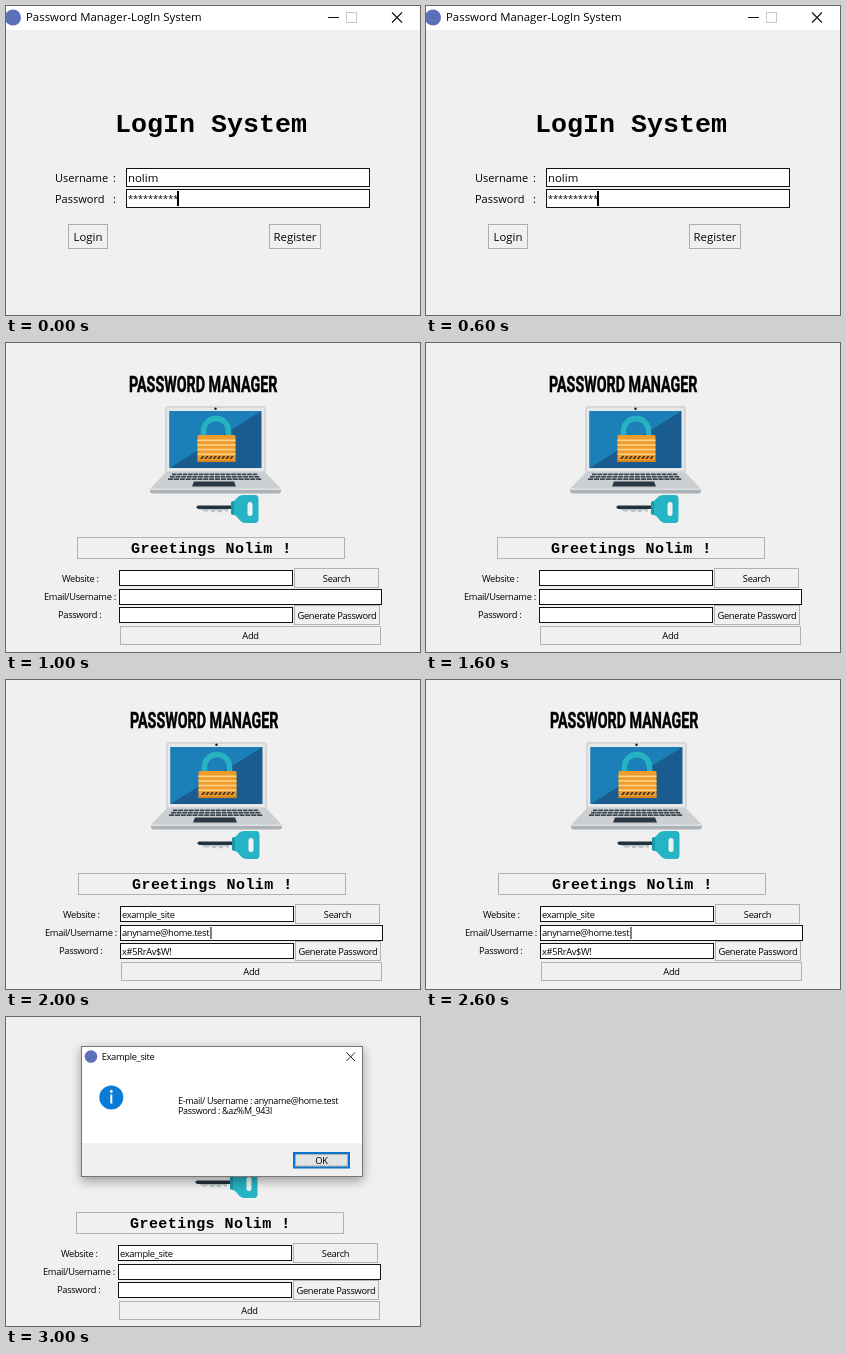
An HTML page that plays this animation: 414x309 px, repeating every 4 s.

```html
<!DOCTYPE html>
<html lang="en">
<head>
<meta charset="utf-8">
<title>Password manager demo</title>
<style>
  html, body { margin: 0; width: 100%; height: 100%; overflow: hidden; background: #f0f0f0; }
  svg { display: block; width: 414px; height: 309px; }
  text { font-family: "Open Sans", "Noto Sans", sans-serif; fill: #000; white-space: pre; }
  .ui { font-size: 11.4px; }
  .label { font-size: 11px; }
  .small { font-size: 9.3px; letter-spacing: -.32px; }
  .note { font-size: 9px; letter-spacing: -.32px; }
  .stars { font-size: 9.1px; }
  .mono { font-family: "Liberation Mono", "Courier New", monospace; font-weight: 700; }
  .title { font-size: 26.67px; }
  .greet { font-size: 15px; letter-spacing: .45px; }
  .head { font-family: Roboto, "Open Sans", sans-serif; font-weight: 700; font-size: 21.5px; stroke: #000; stroke-width: .5; }
  .mid { text-anchor: middle; }
</style>
</head>
<body>
<svg id="stage" viewBox="0 0 414 309" xmlns="http://www.w3.org/2000/svg">
  <defs>
    <filter id="blur" x="-10%" y="-20%" width="120%" height="140%"><feGaussianBlur stdDeviation="5.5"/></filter>
  </defs>
  <rect width="414" height="309" fill="#f0f0f0"/>
  <g id="login"></g>
  <g id="manager"></g>
  <g id="dialog"></g>
</svg>
<script>
const USER = "nolim", NAME = "Nolim", MAIL = "anyname@home.test", SITE = "example_site";
const $ = id => document.getElementById(id);

const rect = (x, y, w, h, fill, extra = "") =>
  `<rect x="${x}" y="${y}" width="${w}" height="${h}" fill="${fill}" ${extra}/>`;
const path = (d, fill, extra = "") => `<path d="${d}" fill="${fill}" ${extra}/>`;
const circle = (x, y, r, fill) => `<circle cx="${x}" cy="${y}" r="${r}" fill="${fill}"/>`;
const text = (x, y, s, cls, extra = "") =>
  `<text x="${x}" y="${y}" class="${cls}" ${extra}>${s.replace(/&/g, "&amp;")}</text>`;
// One-pixel frame whose outer edges are x..x2 and y..y2
const frame = (x, y, x2, y2, fill, line) =>
  rect(x + .5, y + .5, x2 - x - 1, y2 - y - 1, fill, `stroke="${line}"`);
const entry = (...b) => frame(...b, "#fff", "#111");
const button = (x, y, x2, y2, label, base, cls, line = "#b2b2b2") =>
  frame(x, y, x2, y2, "#f0f0f0", line) + text((x + x2) / 2, base, label, cls + " mid");
const cross = (x, y, s, w) =>
  path(`M${x} ${y}l${s} ${s}m0 ${-s}l${-s} ${s}`, "none", `stroke="#111" stroke-width="${w}"`);
const badge = (x, y, r) => circle(x, y, r, "#5b70b9");

function loginView() {
  return rect(0, 0, 414, 24, "#fff") + badge(7, 11.5, 8) +
    text(20, 15, "Password Manager-LogIn System", "ui") +
    rect(322, 11, 11, 1, "#111") + frame(340, 6, 351, 17, "none", "#c8c8c8") + cross(386, 6.5, 10, 1.1) +
    text(109, 126, "LogIn System", "mono title") +
    text(49, 176, "Username", "label") + text(107, 176, ":", "label") +
    text(49, 197, "Password", "label") + text(107, 197, ":", "label") +
    entry(120, 162, 364, 181) + entry(120, 183, 364, 202) +
    text(122, 176, USER, "ui") + text(122, 195.5, "*".repeat(10), "stars") +
    rect(171, 185, 2, 15, "#000") +
    button(62, 218, 102, 243, "Login", 235, "ui", "#adadad") +
    button(263, 218, 315, 243, "Register", 235, "ui", "#adadad");
}

function laptop() {
  let keys = "";
  for (let row = 0; row < 3; row++) {
    const y = 130.5 + row * 2.4, x = 166 - row * 2, step = (209 - x) / 8;
    for (let i = 0; i < 16; i++) keys += rect(x + i * step, y, step - .8, 1.7, "#3a4651");
  }
  return rect(159, 63, 101, 67, "#d3d7da", 'rx="3"') +
    rect(161, 65, 97, 63, "#e6e8e9", 'rx="1"') +
    rect(163.5, 68, 92, 57, "#1a5c90") +
    path("M163.5 68h92L163.5 125z", "#1c80b8") +
    circle(209.5, 65.7, 1.3, "#222") +
    path("M160 129H259L275 146H144z", "#cbcfd1") + keys +
    path("M188 138.5H228L230 143.5H186z", "#2b3742") +
    path("M144 146H275V148Q275 150.5 272 150.5H147Q144 150.5 144 148z", "#adb2b6") +
    rect(144, 145.5, 131, 1.5, "#dfe2e4");
}

function padlock() {
  let bars = "", slots = "";
  for (let i = 0; i < 4; i++) bars += rect(191.5, 96.5 + i * 4.6, 38, 1.6, "#fcd389");
  for (let i = 0; i < 8; i++) slots += path(`M${194 + i * 4.2} 116l2.2 -3h2.2l-2.2 3z`, "#4a3520");
  return path("M197.5 94V88A12.5 12.5 0 0 1 222.5 88V94", "none", 'stroke="#27b2c3" stroke-width="5.5"') +
    rect(191.5, 92, 38, 27, "#f09c2c", 'rx="1.5"') + bars + slots +
    rect(191.5, 117, 38, 2, "#db861f");
}

function key() {
  return path("M190 164L192 162.5H227V166H192z", "#1f3240") +
    path("M194 166h28v2.5h-3v-1.2h-3v2h-4v-1.6h-3v1.4h-4v-1.8h-3v1.2h-4z", "#b9c2c7") +
    path("M225 159Q229 158 231 155Q233 152 238 152H249Q252.5 152 252.5 156V176Q252.5 180 249 180H240Q235 180 232 175Q230 172 225 171z", "#25b4c4") +
    path("M225 159L228 158V172L225 171z", "#1b98a8") +
    rect(241.5, 159, 5, 14, "#eef2f3", 'rx="2.5"');
}

function managerView(site, mail, pass) {
  return text(0, 0, "PASSWORD MANAGER", "head", 'transform="translate(123 49) scale(.665 1)"') +
    laptop() + padlock() + key() +
    frame(71, 194, 339, 216, "#f0f0f0", "#b2b2b2") +
    text(125, 210, `Greetings ${NAME} !`, "mono greet") +
    text(56, 239, "Website :", "small") +
    text(38, 257, "Email/Username :", "small") +
    text(52, 275, "Password :", "small") +
    entry(113, 227, 287, 243) + entry(113, 246, 376, 262) + entry(113, 264, 287, 280) +
    text(115, 238.5, site, "small") + text(115, 257, mail, "small") + text(115, 275.5, pass, "small") +
    button(288, 225, 373, 245, "Search", 239, "small") +
    button(288, 262, 374, 282, "Generate Password", 275.5, "small") +
    button(114, 283, 375, 302, "Add", 296, "small");
}

function dialogView() {
  return rect(75, 32, 282, 132, "#000", 'opacity=".36" filter="url(#blur)"') +
    frame(75, 29, 357, 160, "#fff", "#777") +
    rect(76, 126, 280, 33, "#f0f0f0") +
    badge(85, 39.5, 6.3) + text(95.7, 43, "Example_site", "small") + cross(340.5, 35.5, 8.5, .9) +
    circle(105.3, 80.4, 12, "#0a7bd6") +
    circle(105.3, 74.5, 1.4, "#fff") + rect(104.3, 77.5, 2, 9, "#fff") +
    text(172, 86.5, "E-mail/ Username : " + MAIL, "note") +
    text(172, 96.5, "Password : &az%M_943l", "note") +
    rect(288, 136, 55, 14.5, "#e1e1e1", 'stroke="#0a74cc" stroke-width="2"') +
    rect(289.5, 137.5, 52, 11.5, "none", 'stroke="#555" stroke-width=".7" stroke-dasharray="1 1"') +
    text(315.5, 146.7, "OK", "small mid");
}

const scenes = [
  { login: true },
  { at: [0, 0], fields: ["", "", ""] },
  { at: [1, -1], fields: [SITE, MAIL, "x#5RrAv$W!"], caret: true },
  { at: [-1, 1], fields: [SITE, "", ""], dialog: true }
];

$("login").innerHTML = loginView();
$("dialog").innerHTML = dialogView();

let shown = -1;
function draw(ms) {
  const n = Math.floor(ms / 1000) % scenes.length;
  if (n === shown) return;
  shown = n;
  const s = scenes[n];
  const show = (id, on) => $(id).setAttribute("display", on ? "inline" : "none");
  show("login", s.login);
  show("manager", !s.login);
  show("dialog", s.dialog);
  if (s.login) return;
  $("manager").setAttribute("transform", `translate(${s.at})`);
  $("manager").innerHTML = managerView(...s.fields) + (s.caret ? rect(203.5, 248, 1, 12, "#000") : "");
}

const start = performance.now();
function tick() {
  draw(performance.now() - start);
  requestAnimationFrame(tick);
}
tick();
</script>
</body>
</html>
```
